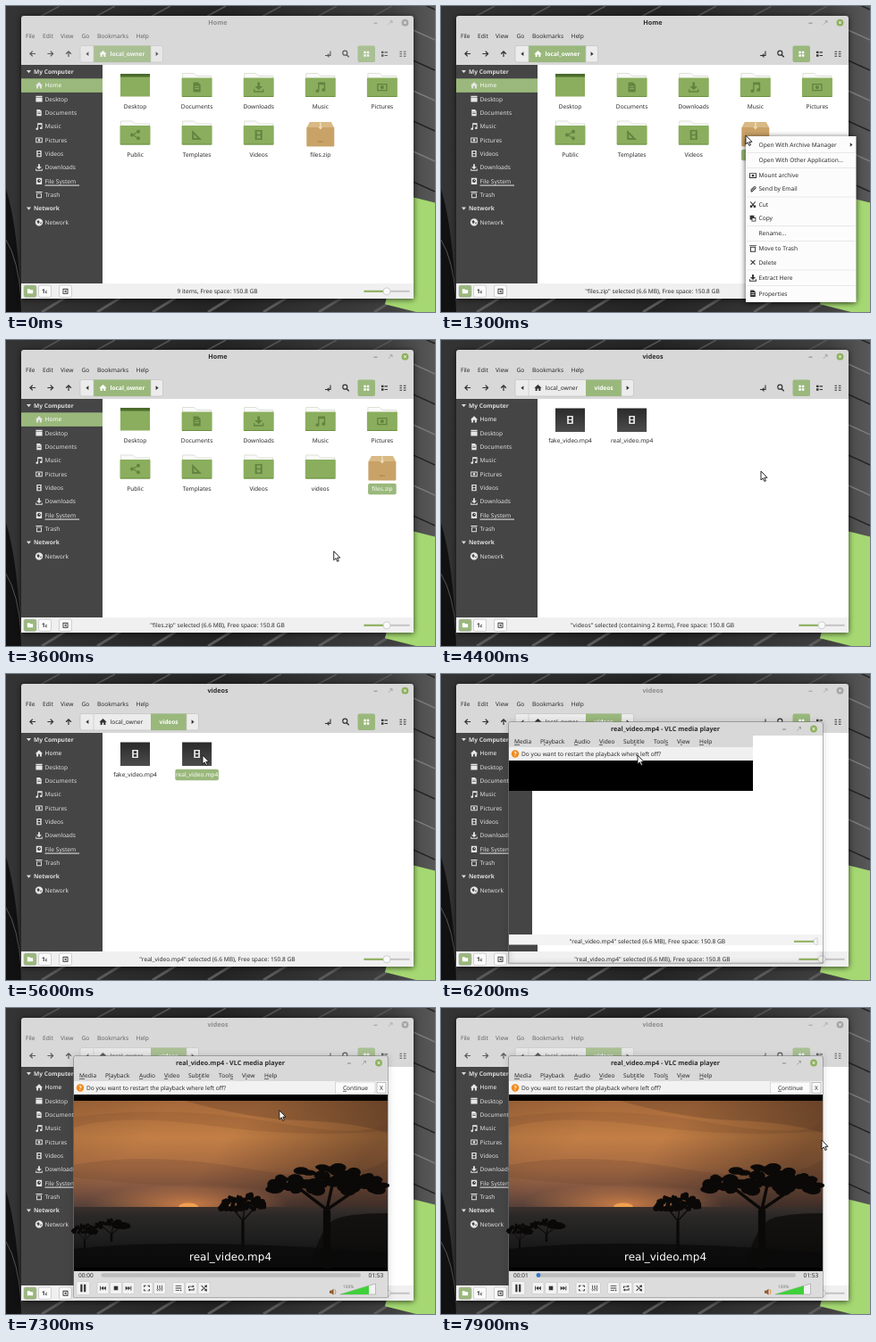
Write an HTML page that moves like this. It is 480 px wide and 343 px high and loops after 8000 ms.

```html
<!DOCTYPE html>
<html lang="en">
<head>
<meta charset="utf-8">
<title>File manager</title>
<style>
html, body { margin: 0; width: 100%; height: 100%; overflow: hidden; background: #222; }
svg { display: block; width: 480px; height: 343px; font: 6.6px "Noto Sans", sans-serif; text-rendering: geometricPrecision; }
text { fill: #2b2b2b; white-space: pre; }
.b { font-weight: 700; }
.title { font-weight: 700; font-size: 7.2px; }
.w { fill: #fff; }
.side { fill: #dedede; }
.blur .title.main { fill: #8c8c8c; }
.blur .close { fill: #969696; }
.blur .buttons.main { opacity: .75; }
.dim .menu { fill: #666; }
.dim .tool { opacity: .75; }
.close { fill: #8db15c; }
.win { filter: drop-shadow(0 1px 3px rgba(0, 0, 0, .7)); }
path.i { fill-rule: evenodd; }
.item rect { fill: none; }
.item.hot rect { fill: #9ab87c; }
.item.hot text { fill: #fff; }
</style>
</head>
<body>
<svg id="stage" viewBox="0 0 480 343"></svg>
<script>
const GREEN = '#9ab87c', LEAF = '#8aae5d', DARK = '#333', SHADE = '#0b0908';
const LOOP = 8000, STEP = 100;
const OWNER = 'local_owner';

const glyphs = {
  home: 'M-4.6.4 0-4 4.6.4H3.2V4H1V1H-1V4H-3.2V.4z',
  desktop: 'M-4-3.7H4V-2.3H-4zM-4-1.6H4V3.7H-4z',
  doc: 'M-3-4H1L3-2V4H-3zM-1.8-1V-.2H1.8V-1zM-1.8.8V1.6H1.8V.8z',
  note: 'M-2-4H4V2A1.5 1.3 0 1 1 2.9 1V-2H-1V3A1.5 1.3 0 1 1-2 1.9z',
  picture: 'M-4.2-3H4.2V3.2H-4.2zM-3.2-2V2.2H3.2V-2zM0-1.4A1.5 1.5 0 1 0 .01-1.4z',
  film: 'M-3-4H3V4H-3zM-1.5-3V-.5H1.5V-3zM-1.5.5V3H1.5V.5z',
  down: 'M-1-4H1V-.8H3.3L0 2.4-3.3-.8H-1zM-4.2 1.6H-3.2V3.2H3.2V1.6H4.2V4.2H-4.2z',
  disk: 'M-3.5-4H3.5V4H-3.5zM0-2.6A2.2 2.2 0 1 0 .01-2.6zM0-1.4H1V-.2H0z',
  trash: 'M-4-4H4V-3H-4zM-3.2-2.2H3.2V4H-3.2zM-2.2-1.2V3H2.2V-1.2z',
  globe: 'M0-4.2A4.2 4.2 0 1 0 .01-4.2zM-2.6-1-.5-2.4.8 0-1 2zM1.2.6 3 0 2 2.3z',
  share: 'M-2.6-1.5A1.5 1.5 0 1 0-2.59-1.5zM2.6-4.3A1.5 1.5 0 1 0 2.61-4.3zM2.6 1.3A1.5 1.5 0 1 0 2.61 1.3zM-1.3-.9 1.3-2.4V-1.5L-1.1 0 1.3 1.5V2.4L-1.3.9z',
  ruler: 'M-4-4 4 4H-4zM-2.5-.5V2.5H.5z',
  grid: 'M-3-3H-.5V-.5H-3zM.5-3H3V-.5H.5zM-3 .5H-.5V3H-3zM.5.5H3V3H.5z',
  list: 'M-3.5-3H-1V-.6H-3.5zM0-2.4H3.5V-1.2H0zM-3.5.6H-1V3H-3.5zM0 1.2H3.5V2.4H0z',
  compact: 'M-3.5-3H-1V-2H-3.5zM.8-3H3.5V-2H.8zM-3.5-.5H-1V.5H-3.5zM.8-.5H3.5V.5H.8zM-3.5 2H-1V3H-3.5zM.8 2H3.5V3H.8z',
  folder: 'M-3.5-2.7H-.5L.3-1.8H3.5V2.7H-3.5z',
  panel: 'M-3.3-3.3H3.3V3.3H-3.3zM-2.3-2.3V2.3H2.3V-2.3zM-1.5 0 1-1.6V1.6z',
  arrow: 'M-3.5 0-.2-3.3.7-2.4-1.1-.6H3.6V.6H-1.1L.7 2.4-.2 3.3z',
  tri: 'M-1.4-2.4 1.6 0-1.4 2.4z',
  prev: 'M-3.5-2.5H-2.5V2.5H-3.5zM-2.3 0 .6-2.5V2.5zM.6 0 3.5-2.5V2.5z',
  stop: 'M-2.4-2.4H2.4V2.4H-2.4z',
  pause: 'M-3-4.2H-.8V4.2H-3zM.8-4.2H3V4.2H.8z',
  full: 'M-3.5-3.5H-1V-2.5H-2.5V-1H-3.5zM1-3.5H3.5V-1H2.5V-2.5H1zM-3.5 1H-2.5V2.5H-1V3.5H-3.5zM2.5 1H3.5V3.5H1V2.5H2.5z',
  mixer: 'M-2.9-3.5H-2.1V3.5H-2.9zM-.4-3.5H.4V3.5H-.4zM2.1-3.5H2.9V3.5H2.1zM-3.5 1H-1.5V2.3H-3.5zM-1-2H1V-.7H-1zM1.5 0H3.5V1.3H1.5z',
  lines: 'M-3.5-3H3.5V-2H-3.5zM-3.5-.5H3.5V.5H-3.5zM-3.5 2H1V3H-3.5zM2 1.5 4 2.6 2 3.7z',
  repeat: 'M-3.5 0V-2.5H1.5V-3.7L3.7-2 1.5-.4V-1.5H-2.5V0zM3.5 0V2.5H-1.5V3.7L-3.7 2-1.5.4V1.5H2.5V0z',
  shuffle: 'M-3.6-2.8-2.8-3.5 2 1.4 3.2.4 3.6 3.6.4 3.2 1.3 2.1zM-3.6 2.7-2.8 3.5-.4 1-1.2.2zM.3-1.2 1.2-.4 2.2-1.400 3.2-.4 3.6-3.600.4-3.200 1.400-2.200z',
  cross: 'M-3-2.2-2.2-3 0-.8 2.2-3 3-2.2.8 0 3 2.2 2.2 3 0 .8-2.2 3-3 2.2-.8 0z',
  copy: 'M-3.5-3.5H1.5V-1H3.5V3.7H-1.5V1.5H-3.5zM-.6-.1V2.8H2.6V-.1z',
  cut: 'M-2.7-3.6 0-.7 2.7-3.6 3.2-3 .7.2 1.5 1A1.4 1.4 0 1 1 .7 2L0 1-.7 2A1.4 1.4 0 1 1-1.5 1L-.7.2-3.2-3z',
  clip: 'M-3 1 1.2-3A1.8 1.8 0 0 1 3.6-.6L-.6 3.5A1.2 1.2 0 0 1-2.3 1.8L1.5-1.9 2-1.4-1.6 2.2-1.2 2.7 2.8-1.2A1 1 0 0 0 1.6-2.3L-2.4 1.6z'
};

const rect = (x, y, w, h, fill, more = '') => `<rect x="${x}" y="${y}" width="${w}" height="${h}" fill="${fill}" ${more}/>`;
const path = (d, fill, more = '') => `<path d="${d}" fill="${fill}" ${more}/>`;
const disc = (x, y, r, fill, more = '') => `<circle cx="${x}" cy="${y}" r="${r}" fill="${fill}" ${more}/>`;
const line = (d, color, w = 1, more = '') => path(d, 'none', `stroke="${color}" stroke-width="${w}" ${more}`);
const text = (x, y, s, cls = '', more = '') => `<text x="${x}" y="${y + 2.4}" class="${cls}" ${more}>${s}</text>`;
const mid = (x, y, s, cls = '', more = '') => text(x, y, s, cls, `text-anchor="middle" ${more}`);
const icon = (name, x, y, fill = DARK, k = 1, turn = 0) =>
  `<path class="i" d="${glyphs[name]}" fill="${fill}" transform="translate(${x} ${y}) rotate(${turn}) scale(${k})"/>`;
// Shown only in the given "from-to" spans (ms).
const when = (spans, body) => `<g data-t="${spans}">${body}</g>`;
const group = (cls, body) => `<g class="${cls}">${body}</g>`;
const under = s => s.replace(/_(.)/, '<tspan text-decoration="underline">$1</tspan>');

const colX = c => 144.5 + c * 69.1;
const rowY = r => 89 + r * 53.5;

function label(x, y, s, chosen) {
  const w = s.length * 3.4 + 1;
  return (chosen ? rect(x - w / 2, y - 6, w, 12.5, GREEN, 'rx="2"') : '') + mid(x, y, s, chosen ? 'w' : '');
}

function folder(c, r, name, glyph, chosen) {
  const x = colX(c), y = rowY(r);
  const body = glyph === 'desktop'
    ? rect(x - 16.5, y - 13, 33, 25.5, LEAF) + rect(x - 16.5, y - 13, 33, 3.5, '#4c6b2c')
    : path(`M${x - 16} ${y - 6}V${y - 13.5}H${x - 3}L${x} ${y - 10.5}H${x + 16}V${y - 6}z`, '#fafafa', 'stroke="#cfd6c6" stroke-width=".7"')
      + rect(x - 17, y - 8.5, 34, 21.5, LEAF, 'rx="1"') + rect(x - 16.5, y + 12, 33, 1, '#6e9143')
      + (glyph ? icon(glyph, x, y + 2, '#638340', 1.35) : '');
  return body + label(x, y + 23.7, name, chosen);
}

function zip(c, chosen) {
  const x = colX(c), y = rowY(1);
  return path(`M${x - 12} ${y - 12.5}H${x + 12}L${x + 15.5} ${y - 6}H${x - 15.5}z`, '#d9ba85')
    + rect(x - 15.5, y - 6.5, 31, 21.5, '#c9a268', 'rx="1"')
    + path(`M${x - .8} ${y - 12}H${x + .8}V${y - 7}H${x + 2.6}L${x} ${y - 4} ${x - 2.6} ${y - 7}H${x - .8}z`, '#efdcb8')
    + rect(x - 3, y + 9, 6, 1.2, '#ae8850') + label(x, y + 24.2, 'files.zip', chosen);
}

function clip(c, name, chosen) {
  const x = colX(c);
  return rect(x - 16.5, 76.5, 33, 26.5, 'url(#thumb)') + icon('film', x, 89.5, '#eee', 1.1) + label(x, 112.7, name, chosen);
}

function wallpaper() {
  let s = rect(0, 0, 480, 343, 'url(#wall)');
  for (let i = 0; i < 7; i++) {
    s += line(`M440 ${i * 34 - 14}L480 ${i * 34 + 4}`, i % 2 ? '#7c7c7c' : '#222', 1.5);
    s += line(`M${60 + i * 62} 0l-22 12`, '#555', 1.5) + line(`M${40 + i * 62} 343l26-16`, '#5a5a5a', 3);
  }
  s += path('M0 205Q14 250 17 343H0z', '#111') + line('M0 262Q14 285 17 330', '#555', 1);
  return s + rect(454, 214, 124, 124, '#a5d872', 'transform="rotate(14 454 214)"');
}

function pathBar(inVideos) {
  const end = inVideos ? 202 : 162;
  return group('tool', rect(83, 44.5, end + 13.5 - 83, 18.5, '#ececec', 'rx="2" stroke="#bdbdbd" stroke-width=".6"')
    + (inVideos ? rect(162, 44.5, 40, 18.5, GREEN) : rect(98, 44.5, 64, 18.5, GREEN))
    + line(`M98 44.5V63M${end} 44.5V63`, '#c4c4c4', .6)
    + icon('tri', 91, 53.7, DARK, 1, 180) + icon('tri', end + 7, 53.7)
    + icon('home', 108.5, 53.5, inVideos ? DARK : '#fff', .9)
    + text(116.5, 53.3, OWNER, inVideos ? '' : 'b w')
    + (inVideos ? mid(182, 53.3, 'videos', 'b w') : ''));
}

function sidebar() {
  const rows = 'Home,Desktop,Documents,Music,Pictures,Videos,Downloads,File System,Trash'.split(',');
  const marks = 'home,desktop,doc,note,picture,film,down,disk,trash'.split(',');
  const y = i => 73.5 + i * 15.35;
  const head = (i, s) => path(`M23 ${y(i) - 1.5}h5l-2.5 3.2z`, '#ddd') + text(31, y(i), s, 'b side');
  return rect(17, 66, 91, 245, '#454545')
    + when('0-4300', rect(17, 81.3, 91, 15.6, GREEN))
    + head(0, 'My Computer') + rows.map((s, i) => icon(marks[i], 37, y(i + 1), '#e6e6e6', .9) + text(43.5, y(i + 1), s, i ? 'side' : 'w')).join('')
    + rect(43.5, 200.5, 38.5, 1.1, '#ddd')
    + head(10, 'Network') + icon('globe', 37, y(11), '#e6e6e6', 1) + text(43.5, y(11), 'Network', 'side');
}

const picked = n => `"${n}" selected (6.6 MB), Free space: 150.8 GB`;

function statusBar() {
  const says = [
    ['0-1300', '9 items, Free space: 150.8 GB'],
    ['1300-2200 3000-4200', picked('files.zip')],
    ['2200-3000', 'Extract the selected archive to the current position'],
    ['4200-5600', '"videos" selected (containing 2 items), Free space: 150.8 GB'],
    ['5600-8000', picked('real_video.mp4')]
  ];
  const box = (x, fill) => rect(x, 313, 14, 13.5, fill, 'rx="2" stroke="#b5b5b5" stroke-width=".6"');
  return rect(17, 311, 439, 17, '#f0f0f0')
    + box(20, GREEN) + icon('folder', 27, 319.8, '#fff', .9)
    + box(36.5, '#fafafa') + text(40, 319.6, '1<tspan font-size="5">c</tspan>', 'b')
    + box(59.5, '#fafafa') + icon('panel', 66.5, 319.8, DARK, .9)
    + says.map(([t, s]) => when(t, mid(236.5, 319.6, s))).join('')
    + rect(400.5, 318.8, 51, 2, '#c4c4c4') + rect(400.5, 318.8, 25, 2, '#8db15c')
    + disc(426, 319.8, 4, '#fafafa', 'stroke="#b5b5b5" stroke-width=".6"');
}

const winButtons = (x, y, cls) => group('buttons ' + cls, rect(x - 35, y, 4, 1, '#888')
  + line(`M${x - 18.5} ${y + 2}l4-4m-2.4 0h2.4v2.4`, '#999', .8)
  + disc(x, y, 3.9, '#8db15c', cls ? 'class="close"' : '') + icon('cross', x, y, '#fff', .55));

function fileWindow() {
  const menu = [[22, 'File'], [41, 'Edit'], [61, 'View'], [84.5, 'Go'], [102, 'Bookmarks'], [145.5, 'Help']];
  const tools = icon('arrow', 29.5, 53.5) + icon('arrow', 50, 53.5, DARK, 1, 180) + icon('arrow', 70, 53.5, DARK, 1, 90)
    + line('M357 55.5h4m2-5v5h-3m1.5-1.8-2 1.8 2 1.8', DARK, 1.1)
    + disc(379.3, 52.7, 2.5, 'none', 'stroke="#333" stroke-width="1.2"') + line('M381 54.5l2.7 2.8', DARK, 1.4)
    + rect(393.5, 44.5, 19.5, 18.5, GREEN, 'rx="2"') + icon('grid', 403.3, 53.7, '#fff')
    + icon('list', 423.5, 53.7) + icon('compact', 444, 53.7);
  return path('M17 328V14Q17 11 20 11H453Q456 11 456 14V328z', '#d8d8d8', 'class="win"')
    + when('0-4300', mid(237, 19, 'Home', 'title main')) + when('4300-8000', mid(237, 19, 'videos', 'title main'))
    + winButtons(446.5, 18.7, 'main')
    + menu.map(([x, s]) => text(x, 34, s, 'menu')).join('') + group('tool', tools)
    + rect(108, 66, 348, 245, '#fff') + sidebar()
    + when('0-4300', pathBar(false)
      + folder(0, 0, 'Desktop', 'desktop') + folder(1, 0, 'Documents', 'doc') + folder(2, 0, 'Downloads', 'down')
      + folder(3, 0, 'Music', 'note') + folder(4, 0, 'Pictures', 'picture')
      + folder(0, 1, 'Public', 'share') + folder(1, 1, 'Templates', 'ruler') + folder(2, 1, 'Videos', 'film')
      + when('0-1300', zip(3, false)) + when('1300-3000', zip(3, true))
      + when('3000-4200', folder(3, 1, 'videos', '') + zip(4, true))
      + when('4200-4300', folder(3, 1, 'videos', '', true) + zip(4, false)))
    + when('4300-8000', pathBar(true) + clip(0, 'fake_video.mp4')
      + when('4300-5600', clip(1, 'real_video.mp4')) + when('5600-8000', clip(1, 'real_video.mp4', true)))
    + statusBar();
}

const menuItems = [
  [155.5, 'Open With Archive Manager', 'box'], [173, 'Open With Other Application...'],
  [190, 'Mount archive', 'picture'], [205, 'Send by Email', 'clip'],
  [222.5, 'Cut', 'cut'], [238, 'Copy', 'copy'], [255, 'Rename...'],
  [272, 'Move to Trash', 'trash'], [287.3, 'Delete', 'cross'],
  [304.7, 'Extract Here', 'down'], [322.3, 'Properties', 'doc']
];

function contextMenu() {
  const seps = [164.3, 181.5, 214, 246.5, 263.5, 296, 313.5];
  return rect(341, 146, 123.5, 186, '#fcfcfc', 'class="win"')
    + seps.map(y => rect(342, y - .3, 121.5, .6, '#dcdcdc')).join('')
    + menuItems.map(([y, s, g]) => `<g class="item">${rect(341.5, y - 7.8, 122.5, 15.6, 'none')}${
      g === 'box' ? rect(345.3, y - 3.7, 7.5, 7.5, '#c9a268') : g ? icon(g, 349, y, DARK, .95) : ''}${text(355.5, y, s)}</g>`).join('')
    + icon('tri', 459, 155.5, DARK, .9);
}

let seed = 7;
const rnd = () => (seed = seed * 16807 % 2147483647) / 2147483647;

// Flat-topped tree: clustered leaves over a forked trunk.
function acacia(x, y, w, h, base) {
  let s = '';
  for (let i = 0; i < 70; i++) {
    const u = rnd() * 2 - 1, arch = 1 - u * u;
    const ly = y + h * (.55 - .42 * arch + rnd() * .42 * (.4 + arch));
    s += `<ellipse cx="${x + u * w * .46}" cy="${ly}" rx="${w * (.03 + rnd() * .04)}" ry="${h * (.06 + rnd() * .07)}"/>`;
  }
  const fork = y + h * 1.15;
  return `<g fill="${SHADE}">${s}</g>`
    + line(`M${x} ${base}V${fork}L${x - w * .25} ${y + h * .6}M${x} ${fork}L${x + w * .05} ${y + h * .5}M${x} ${fork}L${x + w * .28} ${y + h * .6}`, SHADE, w * .025)
    + line(`M${x} ${base}V${fork}`, SHADE, w * .06);
}

function film() {
  return rect(76, 97, 351, 198, '#000') + rect(76, 104, 351, 187, 'url(#sky)')
    + path('M200 104H427V140Q390 128 330 126T200 104z', '#5a3a26', 'opacity=".3"')
    + path('M76 122Q190 108 300 128T427 126V138Q330 146 230 132T76 134z', '#8d5733', 'opacity=".3"')
    + path('M76 176Q160 160 270 180T427 170V200Q250 210 76 190z', '#6d4630', 'opacity=".25"')
    + rect(76, 104, 351, 120, 'url(#dusk)')
    + rect(76, 150, 351, 74, 'url(#glow)') + path('M193 223a11 4.500 0 0 1 22 0z', '#f0a050')
    + rect(76, 223, 351, 68, 'url(#land)')
    + acacia(118, 235, 42, 16, 262) + acacia(88, 240, 30, 18, 270)
    + acacia(265, 204, 54, 30, 290) + acacia(359, 171, 136, 48, 292)
    + path('M340 291Q352 246 366 238T427 230V291z', SHADE, 'opacity=".7"')
    + path('M76 270Q200 256 427 274V291H76z', '#0a0a0a', 'opacity=".8"')
    + '<rect id="veil" x="76" y="97" width="351" height="198"/>'
    + `<text x="251" y="283" text-anchor="middle" style="font:12px 'DejaVu Sans',sans-serif;fill:#fff">real_video.mp4</text>`;
}

function playerControls() {
  const buttons = [['prev', 108.5], ['stop', 123], ['prev', 137, 180], ['full', 157.5], ['mixer', 172], ['lines', 193], ['repeat', 207.3], ['shuffle', 221.6]];
  const frame = (x, w) => rect(x - w / 2, 314 - w / 2, w, w, '#f3f3f3', 'rx="1.5" stroke="#c4c4c4" stroke-width=".6"');
  return rect(76, 295, 351, 29, '#dcdcdc')
    + when('0-7600', text(81, 299.8, '00:00')) + when('7600-8000', text(81, 299.8, '00:01')) + text(405.5, 299.8, '01:53')
    + rect(106.5, 297.3, 290.5, 4.4, '#bdbdbd', 'rx="2"')
    + when('7600-8000', disc(109, 299.5, 2.4, '#3478c8'))
    + frame(86.3, 15) + icon('pause', 86.3, 314)
    + buttons.map(([g, x, turn]) => frame(x, 13) + icon(g, x, 314, DARK, .95, turn)).join('')
    + path('M362 316.7h2l2.5-2v7l-2.5-2h-2z', '#8c5a2c') + line('M368 315.5q2 2.7 0 5.4', '#e58a2c', 1)
    + path('M374 321 413.5 309V321z', '#f3f3f3', 'stroke="#999" stroke-width=".6"') + path('M374 321 406 311.3V321z', '#3fd03a')
    + text(377, 312, '100%', '', 'style="font-size:4.8px;fill:#777"');
}

function player() {
  const menu = [[82, '_Media'], [111, 'P_layback'], [149, '_Audio'], [177, '_Video'], [204, 'Sub_title'], [238, 'Tool_s'], [264, 'V_iew'], [289, '_Help']];
  const stale = rect(76, 69, 351, 242, '#fff') + rect(76, 131, 26, 161, '#454545')
    + rect(76, 69, 273, 13, '#d8d8d8') + rect(76, 82, 273, 15, '#f0f0f0') + rect(76, 97, 273, 34, '#000')
    + rect(76, 292, 351, 12, '#f3f3f3') + rect(76, 303.5, 32, 7.5, '#454545')
    + mid(231, 299.8, picked('real_video.mp4')) + rect(395, 298.8, 24, 2, '#8db15c')
    + path('M421 295.8a4 4 0 0 0 0 8z', '#fafafa', 'stroke="#bbb" stroke-width=".6"');
  const ready = rect(76, 69, 351, 13, '#d8d8d8') + rect(76, 82, 351, 15, '#f2f2f2')
    + rect(368.5, 83, 44.5, 13, '#fafafa', 'stroke="#c4c4c4" stroke-width=".6"') + mid(391, 89.5, under('_Continue'))
    + rect(415, 83.5, 10, 12, '#fafafa', 'stroke="#999" stroke-width=".6"') + mid(420, 89.5, 'X')
    + film() + playerControls();
  return line('M75.7 324.2V56Q75.7 53.7 78 53.7H425Q427.3 53.7 427.3 56V324.2z', '#777', .7, 'class="win"')
    + path('M76 69V56Q76 54 78 54H425Q427 54 427 56V69z', '#d8d8d8')
    + mid(251, 62, 'real_video.mp4 - VLC media player', 'title') + winButtons(417, 61.5, '')
    + when('6100-6400', stale) + when('6400-8000', ready)
    + menu.map(([x, s]) => text(x, 75.7, under(s))).join('')
    + disc(83, 89.5, 4.2, '#f08a1d') + mid(83, 89.4, '?', 'b w') + text(90, 89.5, 'Do you want to restart the playback where left off?');
}

const stops = list => list.map(([o, c, a = 1]) => `<stop offset="${o}" stop-color="${c}" stop-opacity="${a}"/>`).join('');
const fade = (id, list, dir = 'x2="0" y2="1"') => `<linearGradient id="${id}" ${dir}>${stops(list)}</linearGradient>`;

const stage = document.getElementById('stage');
stage.innerHTML = `<defs>
  ${fade('wall', [[0, '#343434'], [.5, '#242424'], [.9, '#3f3f3f'], [1, '#585858']], 'x2="1" y2="0"')}
  ${fade('thumb', [[0, '#2a2a2a'], [1, '#4c4c4c']])}
  ${fade('sky', [[0, '#a5683a'], [.22, '#c27e45'], [.4, '#a86c42'], [.54, '#7c5340'], [.64, '#543f38']])}
  ${fade('dusk', [[0, '#1c1410', .12], [.3, '#1c1410', 0], [.55, '#1c1410', 0], [1, '#1c1410', .4]], 'x2="1" y2=".3"')}
  ${fade('land', [[0, '#3a302c'], [.15, '#2a2827'], [.5, '#1f1f1f'], [1, '#0a0a0a']])}
  <radialGradient id="glow" cx=".365" cy=".95" r=".32">${stops([[0, '#f0904a', .75], [1, '#e08848', 0]])}</radialGradient>
  </defs>` + wallpaper() + fileWindow() + when('1300-2400', contextMenu()) + when('6100-8000', player())
  + '<path id="cursor" d="M0 0V10L2.3 7.9 3.9 11.5 5.5 10.8 3.9 7.3H7z" fill="#fff" stroke="#111" stroke-width=".9"/>';

const timed = [...stage.querySelectorAll('[data-t]')].map(el => ({
  el, spans: el.dataset.t.split(' ').map(s => s.split('-').map(Number))
}));
const items = [...stage.querySelectorAll('.item')];
const cursor = document.getElementById('cursor'), veil = document.getElementById('veil');

// Pointer stops: time, x, y.
const route = [[600, 388, 91], [800, 341, 145], [1300, 341, 145], [2200, 373, 301], [3200, 373, 301],
  [4100, 358, 147], [4700, 358, 147], [5400, 220, 91], [6900, 220, 91], [7800, 426, 148], [LOOP, 426, 148]];

function pointer(t) {
  const n = Math.max(1, route.findIndex(p => p[0] >= t));
  const [a, b] = [route[n - 1], route[n]];
  const u = Math.max(0, (t - a[0]) / (b[0] - a[0])), e = u * u * (3 - 2 * u);
  return [a[1] + (b[1] - a[1]) * e, a[2] + (b[2] - a[2]) * e];
}

function draw() {
  const t = Math.floor(performance.now() % LOOP / STEP) * STEP;
  for (const { el, spans } of timed) el.style.display = spans.some(([a, b]) => t >= a && t < b) ? '' : 'none';
  const away = t < 1300 || t === 3000;
  stage.classList.toggle('blur', away || t >= 6100);
  stage.classList.toggle('dim', away || t >= 6400);
  const [x, y] = pointer(t);
  cursor.setAttribute('transform', `translate(${x} ${y})`);
  cursor.style.display = t < 600 ? 'none' : '';
  items.forEach((el, i) => el.classList.toggle('hot', t > 1300 && Math.abs(y - menuItems[i][0]) < 7.8));
  veil.setAttribute('opacity', 1 - Math.min(1, Math.max(0, (t - 6300) / 900)));
  requestAnimationFrame(draw);
}
draw();
</script>
</body>
</html>
```
